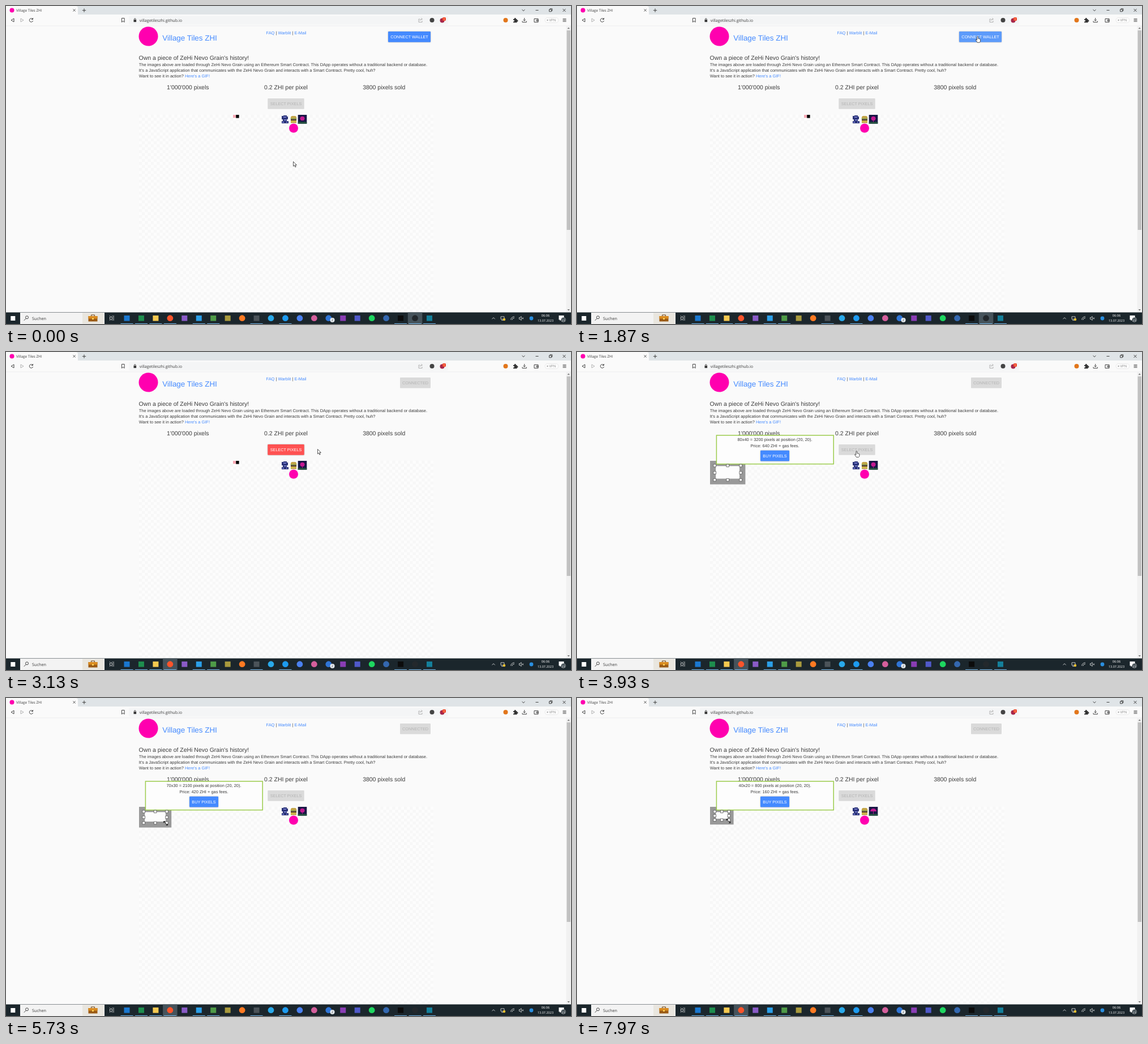
Animation, 998 px wide and 561 px high, one loop 8000 ms. Source, as an HTML page:

```html
<!DOCTYPE html>
<html lang="en">
<head>
<meta charset="utf-8">
<title>Village Tiles ZHI</title>
<style>
  html, body { margin: 0; width: 100%; height: 100%; overflow: hidden; background: #fafafa; }
  svg { display: block; width: 998px; height: 561px; }
  text { font-family: "Liberation Sans", Arial, sans-serif; font-size: 7.44px; fill: #3c3c3c;
         text-rendering: geometricPrecision; white-space: pre; }
  .ui text { font-family: "Open Sans", "Noto Sans", sans-serif; }
  .mid { text-anchor: middle; }
  .big { font-size: 10.47px; }
  .button text { font-size: 7.28px; text-anchor: middle; }
  .raised { filter: drop-shadow(0 .8px .8px rgba(0, 0, 0, .3)); }
  .link { fill: #448aff; }
  .line { fill: none; stroke: #333; stroke-width: .9; }
  .pale { stroke: #aaa; }
  .light { fill: none; stroke: #eee; stroke-width: .8; }
</style>
</head>
<body>
<svg viewBox="0 0 998 561">
  <defs>
    <pattern id="checker" x="235" y="192" width="10.4" height="10.4" patternUnits="userSpaceOnUse">
      <path fill="#fdfdfd" d="M0 0h10.4v10.4H0z"/>
      <path fill="#f7f7f7" d="M0 0h5.2v5.2H0zM5.2 5.2h5.2v5.2H5.2z"/>
    </pattern>
  </defs>
  <rect width="998" height="561" fill="#fafafa"/>

  <!-- Browser chrome -->
  <g class="ui">
    <rect width="998" height="15" fill="#dfe4e7"/>
    <path fill="#fafafa" d="M0 0h123q4 0 4 4v11H0zM0 15h998v20H0z"/>
    <rect x="217" y="17.5" width="564" height="15" rx="2" fill="#f4f5f6"/>
    <path stroke="#e2e3e6" stroke-width=".6" d="M0 35h998"/>
    <circle cx="10.5" cy="7.5" r="4" fill="#ff00af"/>
    <text x="18" y="9.8" style="font-size:6.3px">Village Tiles ZHI</text>
    <path class="line" d="M118.5 5.5l4 4m0-4l-4 4M138 4.5v6.4M134.8 7.7h6.4"/>
    <path class="line" d="M14 22v6l-5-3z"/>
    <path class="line pale" d="M26 22v6l5-3z"/>
    <path class="line" d="M47 23a3.2 3.2 0 1 0 .6 3M47.5 21v2.6h-2.6"/>
    <path class="line" d="M204.5 21.5h4.6v7l-2.3-1.8-2.3 1.8z"/>
    <path fill="#333" d="M225.5 24.2h4.6v4h-4.6z"/>
    <path class="line" d="M226.5 24.2v-1a1.3 1.3 0 0 1 2.6 0v1"/>
    <text x="235.8" y="27.5" style="font-size:7.15px">villagetileszhi.github.io</text>
    <path class="line pale" d="M731 23h-2v5.5h6V26M731 26q0-3 4-3m-1.5-1.7l1.9 1.7-1.9 1.7"/>
    <circle cx="752.5" cy="25" r="4" fill="#444"/>
    <circle cx="770.5" cy="25.5" r="4" fill="#a5264a"/>
    <rect x="771" y="20" width="6" height="6" rx="1.5" fill="#f04a2a"/>
    <text class="mid" x="774" y="24.8" style="font-size:5px;fill:#fff">1</text>
    <circle cx="882.5" cy="25" r="4" fill="#e2761b"/>
    <path fill="#333" d="M896 23h2a1.4 1.4 0 1 1 2.6 0h2v2a1.3 1.3 0 1 1 0 2.4v1.8H896v-2a1.3 1.3 0 1 0 0-2.2z"/>
    <path class="line" d="M915.7 21v5m-2.2-2l2.2 2.2 2.2-2.2M912 26.5v2h7.4v-2"/>
    <path class="line" d="M933 22.5h7v6h-7zM937 24.5h3v2h-3z"/>
    <rect x="952" y="20.5" width="24" height="9" rx="4.5" fill="#fcfcfc" stroke="#ddd" stroke-width=".6"/>
    <circle cx="956.5" cy="25" r="1.2" fill="#aaa"/>
    <text x="959.5" y="27.2" style="font-size:6px;fill:#888">VPN</text>
    <path class="line" d="M983.5 22.8h6M983.5 25h6M983.5 27.2h6"/>
    <path class="line" d="M911.5 6.3l2.5 2.4 2.5-2.4M935.5 7.5h5M959.5 6h3.8v3.8h-3.8zM961 6V4.8h3.8v3.8h-1.3M983.5 5l5 5m0-5l-5 5"/>
    <rect x="989.5" y="35.5" width="8.5" height="505" fill="#f1f1f1"/>
    <rect x="990.5" y="43" width="6.5" height="352" fill="#c1c1c1"/>
    <path fill="#777" d="M991.5 40.2l2.2-2.4 2.2 2.4zM991.5 535l2.2 2.4 2.2-2.4z"/>
  </g>

  <!-- Page -->
  <circle cx="251.5" cy="53.5" r="17" fill="#ff00af"/>
  <text class="link" x="276.3" y="61.4" style="font-size:13.4px">Village Tiles ZHI</text>
  <text x="459.5" y="49.8"><tspan class="link">FAQ</tspan> | <tspan class="link">Warblit</tspan> | <tspan class="link">E-Mail</tspan></text>
  <text class="big" x="234.6" y="94.5">Own a piece of ZeHi Nevo Grain's history!</text>
  <text x="234.8" y="105.5">The images above are loaded through ZeHi Nevo Grain using an Ethereum Smart Contract. This DApp operates without a traditional backend or database.</text>
  <text x="234.8" y="115.9">It's a JavaScript application that communicates with the ZeHi Nevo Grain and interacts with a Smart Contract. Pretty cool, huh?</text>
  <text x="234.8" y="126.3">Want to see it in action? <tspan class="link">Here's a GIF!</tspan></text>
  <text class="big mid" x="321.3" y="146.6">1'000'000 pixels</text>
  <text class="big mid" x="494.5" y="146.6">0.2 ZHI per pixel</text>
  <text class="big mid" x="667.7" y="146.6">3800 pixels sold</text>
  <g id="connect" class="button raised"><rect x="675" y="45" width="75" height="18.8" rx="1"/><text x="712.5" y="57.2">CONNECT WALLET</text></g>
  <g id="connected" class="button"><rect x="696" y="45" width="54" height="18.8" rx="1" fill="#dadada"/><text x="723" y="57.2" style="fill:#b4b4b4">CONNECTED</text></g>
  <g id="select" class="button"><rect x="462.3" y="163" width="64.4" height="18.8" rx="1"/><text x="494.5" y="175.2">SELECT PIXELS</text></g>
  <rect x="235" y="192" width="520" height="348.5" fill="url(#checker)"/>
  <g id="pair"><path fill="#f6a9b4" d="M401 192h5.2v5.2H401z"/><path d="M406.2 192h5.4v5.6h-5.4z"/></g>
  <path fill="#2b3478" d="M487 194h3v-1h6v2h2v5h-2v3h3v4h-12v-4h2v-3h-2z"/>
  <path fill="#7279c8" d="M490 195h5v2h-5zM491 200h4v2h-4zM488 204h3v2h-3zM495 204h2v2h-2z"/>
  <path fill="#c3a64a" d="M504.5 194h7l1.6 2v2h-10.2v-2zM503 204h10v2.5h-10z"/>
  <path fill="#7d9a3a" d="M502.8 198h10.4v1.6h-10.4z"/>
  <path fill="#4d3320" d="M503 199.6h10v2.6h-10z"/>
  <path fill="#d4b93f" d="M503 202.2h10v1.8h-10z"/>
  <rect x="515.7" y="192" width="15.6" height="15.6" fill="#191746"/>
  <path fill="#24553f" d="M515.7 204.6h15.6v3h-15.6z"/>
  <path id="stem" stroke="#a81b86" d="M523.5 199v6"/>
  <path id="bloom" fill="#c41a92"/>
  <circle cx="508" cy="215.5" r="8" fill="#ff00af"/>

  <g id="selection">
    <path id="shade" fill="#999" fill-rule="evenodd"/>
    <rect x="246.4" y="147" width="206.8" height="50.6" fill="#fdfdfd" stroke="#9ccc4c" stroke-width="1.5"/>
    <text id="size" class="mid" x="349.5" y="157.4"></text>
    <text id="price" class="mid" x="349.5" y="167.8"></text>
    <g class="button raised"><rect x="324" y="173.8" width="51" height="18.7" rx="1" fill="#448aff"/><text x="349.5" y="185.8" style="fill:#fff">BUY PIXELS</text></g>
    <path id="opening" fill="#fdfdfd"/>
    <path id="handles" fill="#fff" stroke="#555" stroke-width=".8"/>
  </g>

  <!-- Taskbar -->
  <g class="ui">
    <rect y="540.5" width="998" height="20.5" fill="#1b262c"/>
    <rect x="8.3" y="547" width="8" height="8" fill="#fff"/>
    <rect x="25" y="541" width="149" height="20" fill="#f3f3f3"/>
    <path class="line" d="M35.2 551.3l-3.4 3.5"/><circle class="line" cx="37" cy="549.3" r="2.5"/>
    <text x="46" y="553.5" style="font-size:7.3px">Suchen</text>
    <rect x="135" y="541.5" width="38" height="19" fill="#e9e6df"/>
    <path fill="#9a5a14" d="M145.5 547h16v9.5h-16z"/><path fill="#d98a1f" d="M145.5 547h16v4.6h-16z"/>
    <path fill="none" stroke="#6b3d0c" d="M150.5 547v-2h6v2"/><path fill="#ffd75e" d="M152 550.5h3v2.5h-3z"/>
    <path class="light" d="M183.5 548.5h4v4.5h-4zM183.5 546v1M187.5 546v1M183.5 555v-1M187.5 555v-1M190 546v9"/>
    <rect id="active" y="540.5" width="25.5" height="20.5" fill="#46535b"/>
    <g id="apps"></g>
    <circle cx="576.5" cy="554" r="4" fill="#e8eef2"/><text class="mid" x="576.5" y="556.1" style="font-size:5.8px">2</text>
    <path class="light" d="M858.5 552.3l2.6-2.6 2.6 2.6M874 548h6v4.5h-6zM875 554.5h4M891.5 553.5a7 7 0 0 1 6.5-5.5M893.5 554a5 5 0 0 1 4.5-3.8M906.5 549.5h1.5l2-2v7l-2-2h-1.5zM911.5 549.7l2.5 2.6m0-2.6l-2.5 2.6"/>
    <circle cx="880" cy="553" r="2.2" fill="#f5c32c"/>
    <circle cx="928" cy="551" r="3.4" fill="#2a8fe0"/>
    <text class="mid" x="953" y="548.4" style="font-size:5.7px;fill:#fff">06:06</text>
    <text class="mid" x="953" y="557.4" style="font-size:5.5px;fill:#fff">13.07.2023</text>
    <path fill="#fff" d="M976.5 546h9v7.5h-5l-2 2v-2h-2z"/>
    <circle cx="984.5" cy="553.5" r="4" fill="#39454c" stroke="#ddd" stroke-width=".5"/>
    <text class="mid" x="984.5" y="555.5" style="font-size:5px;fill:#fff">23</text>
  </g>

  <g id="pointer" stroke="#222" stroke-width=".75" stroke-linejoin="round" fill="#fff">
    <path id="arrow" d="M0 0v8.3l1.9-1.8 1.4 3.2 1.4-.6-1.4-3.1h2.6z"/>
    <path id="hand" d="M-1 1q0-1 1-1t1 1v3l3 .6q1 .3 1 1.4v2.4q0 1.6-1.4 2.4h-4L-3 7q-.7-1.5.6-1.5L-1 6.8z"/>
    <path id="resize" fill="#222" d="M-3.5-3.5h2.6l-2.6 2.6zM3.5 3.5H.9l2.6-2.6zM-2.5-2.5l5 5"/>
  </g>
</svg>
<script>
const LOOP = 8000, UNIT = 0.52, GRID = { x: 235, y: 192 };
const TIMES = { hover: 1560, focus: 1950, connected: 2200, selecting: 3750, grab: 5050, bloom: 7500 };
const $ = id => document.getElementById(id);
const show = (id, visible) => { $(id).style.display = visible ? '' : 'none'; };
const setPath = (id, d) => $(id).setAttribute('d', d);

// Taskbar icons: colour, round (r) or square (s), "_" when running.
const apps = `#1a78d0 s_,#1e8e4e s_,#f5c950 s_,#fb542b r_,#8a5bc7 s,#2b9fe8 s_,#4f9b48 s_,#a99a3d s,
  #ff7a22 r,#4b5359 s_,#29a9ea r,#1d9bf0 r_,#4a80f0 r,#d45f9c r,#2f75d6 r,#8a3db5 s,#5059c9 s,
  #1ed760 r,#3468b0 r,#0c0c0c s_,#23282c r_,#14809b s_`.split(',');
$('apps').innerHTML = apps.map((app, i) => {
  const [color, kind] = app.trim().split(' '), x = 213.5 + i * 25.45;
  const icon = kind[0] === 'r' ? `<circle cx="${x}" cy="550.7" r="5.4" fill="${color}"/>`
    : `<rect x="${x - 5}" y="546" width="10" height="9.6" fill="${color}"/>`;
  const bar = kind[1] ? `<path stroke="#76b9ed" d="M${x - 11} 560.4h22"/>` : '';
  return icon + bar;
}).join('');

// Pointer path: time, x, y
const path = [
  [0, 507.5, 274.5], [850, 507.5, 274.5], [1600, 707.5, 53.5], [2350, 707.5, 53.5],
  [3050, 550.5, 171.5], [3200, 550.5, 171.5], [3550, 503, 172], [3850, 503, 172],
  [4450, 319.5, 227.5], [4700, 319.5, 227.5], [5050, 289, 225], [5250, 289, 225],
  [5700, 282, 221], [5780, 282, 221], [6350, 267.5, 217], [LOOP, 267.5, 217]
];
// Selection: time, width, height
const sizes = [[0, 80, 40], [5500, 70, 30], [5950, 60, 30], [6130, 50, 20], [6290, 40, 20]];

function pointerAt(t) {
  const i = path.findIndex(p => p[0] > t), [t0, x0, y0] = path[i - 1], [t1, x1, y1] = path[i];
  const u = (t - t0) / (t1 - t0), ease = u * u * (3 - 2 * u);
  return [x0 + (x1 - x0) * ease, y0 + (y1 - y0) * ease];
}

function box(x, y, w, h) { return `M${x} ${y}h${w}v${h}h${-w}z`; }

function drawSelection(t) {
  const [, w, h] = sizes.filter(s => s[0] <= t).pop();
  const pad = 20 * UNIT, x = GRID.x + pad, y = GRID.y + pad, sw = w * UNIT, sh = h * UNIT;
  const opening = box(x, y - 1, sw, sh + 1);
  setPath('shade', box(GRID.x, GRID.y, sw + 2 * pad, sh + 2 * pad) + opening);
  setPath('opening', opening);
  let handles = '';
  for (const i of [0, .5, 1]) for (const j of [0, .5, 1]) {
    if (i === .5 && j === .5) continue;
    handles += box(x - 4.5 + i * (sw + 4.4), y - 4.3 + j * (sh + 4.4), 4.6, 4.6);
  }
  setPath('handles', handles);
  $('size').textContent = `${w}x${h} = ${w * h} pixels at position (20, 20).`;
  $('price').textContent = `Price: ${w * h / 5} ZHI + gas fees.`;
}

function paintButton(id, background, color) {
  $(id).firstChild.setAttribute('fill', background);
  $(id).lastChild.style.fill = color;
}

function draw(t) {
  const connected = t >= TIMES.connected, selecting = t >= TIMES.selecting;
  const selectable = connected && !selecting;
  show('connect', !connected);
  show('connected', connected);
  paintButton('connect', t >= TIMES.hover ? '#5d9bfa' : '#448aff', '#fff');
  paintButton('select', selectable ? '#ff5252' : '#dadada', selectable ? '#fff' : '#b4b4b4');
  $('select').classList.toggle('raised', selectable);
  show('pair', !selecting);
  show('selection', selecting);
  if (selecting) drawSelection(t);
  $('active').setAttribute('x', t < TIMES.focus ? 709.8 : 277.1);

  show('stem', t > TIMES.hover);
  setPath('bloom', t > TIMES.bloom ? 'M518 200q1-5 5.5-5t5.5 5z'
    : 'M519.5 198.5a4 3.8 0 1 1 8 0q0 2-2 3.5h-4q-2-1.5-2-3.5z');

  const [x, y] = pointerAt(t);
  const overSelect = t > 3420 && t < 4000;
  const hand = (t >= TIMES.hover && t < 2480) || overSelect, resize = t >= TIMES.grab;
  $('pointer').setAttribute('transform', `translate(${x} ${y})`);
  show('hand', hand);
  show('resize', resize);
  show('arrow', !hand && !resize);
}

function tick() {
  draw(performance.now() % LOOP);
  requestAnimationFrame(tick);
}
tick();
</script>
</body>
</html>
```
